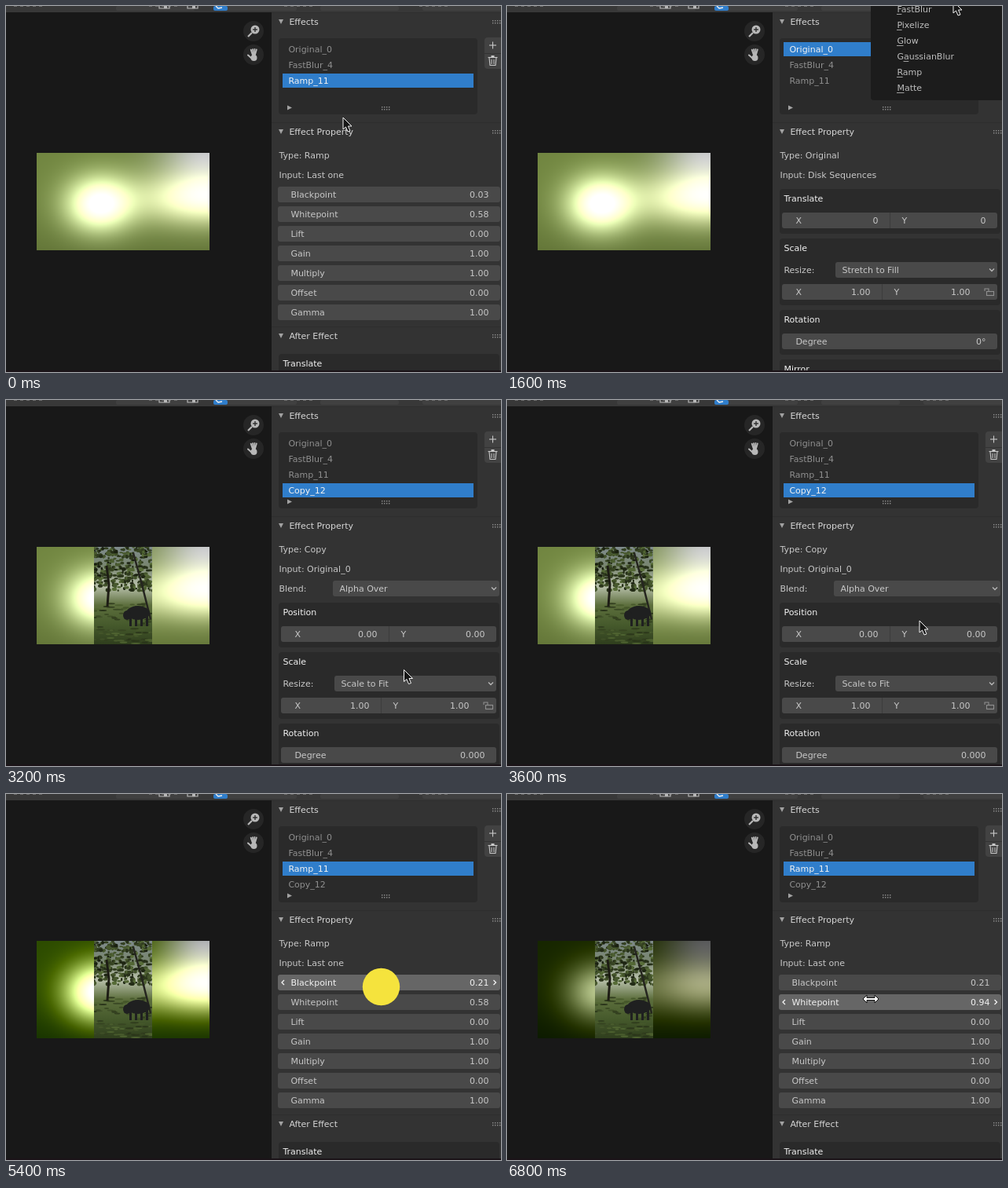
An HTML page with a canvas for the animation above (7 s loop, 630x466 px).

```html
<!DOCTYPE html>
<html lang="en">
<head>
<meta charset="utf-8">
<title>Effect panel</title>
<style>
html, body { margin: 0; width: 630px; height: 466px; overflow: hidden; background: #181818; }
canvas { display: block; }
</style>
</head>
<body>
<canvas id="stage" width="630" height="466"></canvas>
<script>
const c = document.getElementById('stage').getContext('2d', { alpha: false });
const LOOP = 7000, TICK = 200;
const BLUE = '#307ecb', FIELD = '#494949', BOX = '#2a2a2a', PANEL = '#333333', MENU = '#1c1c1c';
const DIM = '#8f8f8f', TEXT = '#c8c8c8', WHITE = '#f2f2f2', ICON = '#b8b8b8';

// Pointer stops; hold is how long the button stays down
const STOPS = [
  { at: 0, x: 429, y: 142 },
  { at: 600, x: 396, y: 56, hold: 200 },
  { at: 1200, x: 618, y: 50, hold: 200 },
  { at: 1600, x: 568, y: -6 },
  { at: 2000, x: 552, y: -36 },
  { at: 2400, x: 488, y: 361, hold: 200 },
  { at: 2600, x: 488, y: 406, hold: 200 },
  { at: 3600, x: 525, y: 281 },
  { at: 4200, x: 440, y: 95, hold: 200 },
  { at: 4800, x: 477, y: 245 },
  { at: 5000, x: 477, y: 245, hold: 600 },
  { at: 6000, x: 463, y: 261 },
  { at: 6200, x: 463, y: 261, hold: 600 }
];

const mix = (a, b, k) => a + (b - a) * k;
const ramp = (t, from, to) => Math.min(1, Math.max(0, (t - from) / (to - from)));
const range = n => [...Array(n).keys()];

function pointerAt(t) {
  const i = STOPS.findLastIndex(s => s.at <= t);
  const a = STOPS[i], b = STOPS[i + 1] || a, left = a.at + (a.hold || 0);
  const k = b === a || t <= left ? 0 : ramp(t, left, b.at);
  return { x: mix(a.x, b.x, k), y: mix(a.y, b.y, k), pressed: t < left };
}

function rect(x, y, w, h, fill, r = 0) {
  c.fillStyle = fill;
  c.beginPath();
  c.roundRect(x, y, w, h, r);
  c.fill();
}

function label(s, x, y, fill = TEXT, align = 'left') {
  c.font = '11px "DejaVu Sans", sans-serif';
  c.textAlign = align;
  c.fillStyle = fill;
  c.fillText(s, x + .4, y + 4);
}

function line(points, color, width) {
  c.strokeStyle = color;
  c.lineWidth = width;
  c.beginPath();
  points.forEach(p => c.lineTo(...p));
  c.stroke();
}

function poly(points, fill) {
  c.fillStyle = fill;
  c.beginPath();
  points.forEach(p => c.lineTo(...p));
  c.closePath();
  c.fill();
}

function disc(x, y, rx, fill, ry = rx) {
  c.fillStyle = fill;
  c.beginPath();
  c.ellipse(x, y, rx, ry, 0, 0, 7);
  c.fill();
}

function plus(x, y, r, color, width) {
  line([[x - r, y], [x + r, y]], color, width);
  line([[x, y - r], [x, y + r]], color, width);
}

function chevron(x, y, turn, color) {
  c.save();
  c.translate(x, y);
  c.rotate(turn * Math.PI / 2);
  line([[-1.5, -3], [1.5, 0], [-1.5, 3]], color, 1.3);
  c.restore();
}

function triangle(x, y, down) {
  c.save();
  c.translate(x, y);
  if (down) c.rotate(Math.PI / 2);
  poly([[-3, -3], [3, 0], [-3, 3]], '#a2a2a2');
  c.restore();
}

function grip(x, y) {
  for (const i of range(8)) rect(x + (i % 4) * 3, y - 2 + (i >> 2) * 3, 1.4, 1.4, '#8c8c8c');
}

function header(s, y) {
  rect(338, y - 12, 292, 1, '#2e2e2e');
  triangle(350, y, true);
  label(s, 360, y, '#d6d6d6');
  grip(619, y);
}

function menuItem(s, x, y, key) {
  const left = c.measureText(s.slice(0, key)).width;
  label(s, x, y, '#bdbdbd');
  c.textAlign = 'left';
  rect(x + left, y + 6, c.measureText(s[key]).width, 1, '#a0a0a0');
}

// Blurred backdrop: a flat olive tone with soft lights, remapped by the ramp levels
const W = 220, H = 124, base = new Float32Array(W * H * 3);
const pixels = c.createImageData(W, H);

function addLight(cx, cy, sx, sy, rgb) {
  for (const i of range(W * H)) {
    const x = (i % W - cx) / sx, y = (Math.floor(i / W) - cy) / sy;
    const g = Math.exp(-(x * x + y * y) / 2);
    rgb.forEach((v, k) => base[i * 3 + k] += v * g);
  }
}
addLight(80, 20, 900, 220, [.275, .32, .17]);
addLight(79, 65, 30, 25, [.45, .45, .43]);
addLight(214, 57, 60, 24, [.40, .37, .38]);
addLight(216, 0, 42, 26, [.17, .13, .28]);

function backdrop(lo, hi) {
  base.forEach((v, i) => pixels.data[Math.floor(i / 3) * 4 + i % 3] = 255 * (v - lo) / (hi - lo));
  for (const i of range(W * H)) pixels.data[i * 4 + 3] = 255;
  c.putImageData(pixels, 39, 187);
}

function meadow(x, y, w) {
  let seed = 7;
  const rnd = () => (seed = seed * 16807 % 2147483647) / 2147483647;
  c.save();
  c.translate(x, y);
  c.scale(w / 74, w / 74);
  c.beginPath();
  c.rect(0, 0, 74, 124);
  c.clip();
  const g = c.createLinearGradient(0, 0, 0, 124);
  ['#7f8b8c', '#78856f', '#b9c1ac', '#5c6e3c', '#465a2c', '#2f3e1d'].forEach((s, i) => g.addColorStop(i / 5, s));
  c.fillStyle = g;
  c.fillRect(0, 0, 74, 124);
  for (const i of range(330))
    disc(74 * rnd() ** 1.2, 56 * rnd() ** 1.1, 1 + 2.6 * rnd(), `hsl(84 32% ${9 + 24 * rnd()}%)`, 1 + 1.5 * rnd());
  for (const i of range(90))
    disc(74 * rnd(), 72 + 52 * rnd(), 2 + 4 * rnd(), `hsl(84 34% ${15 + 16 * rnd()}%)`, 1);
  line([[17, 76], [19, 48], [16, 24]], '#1e1d15', 3);
  line([[50, 8], [60, 44], [72, 92]], '#25251f', 2.5);
  disc(56, 84, 15, '#1f2020', 9);
  disc(42, 87, 5, '#1f2020', 6);
  for (const i of range(4)) rect(45 + 7 * i, 87, 3, 14, '#1f2020');
  c.restore();
}

function navButtons() {
  for (const y of [32, 62]) disc(315, y, 13, '#262626');
  line([[308, 39], [313, 34]], ICON, 2.2);
  disc(317, 30, 5.5, ICON);
  plus(317, 30, 3, '#262626', 1.3);
  c.lineCap = 'round';
  for (const i of range(4)) {
    const a = (i - 1.6) * .2;
    line([[315.5, 67], [315.5 + 12 * Math.sin(a), 67 - 12 * Math.cos(a)]], ICON, 1.9);
  }
  line([[308, 62.5], [313, 67]], ICON, 2);
  c.lineCap = 'butt';
  disc(315.5, 66, 4, ICON);
}

function topBar() {
  rect(0, 0, 630, 8, '#383838');
  for (const i of range(4)) {
    rect(140 + 130 * i, 0, 100, 6, '#404040', 2);
    for (const k of range(5)) rect(10 + 172 * i + 8 * k, 0, 4, 1, '#6a6a6a');
  }
  rect(264, 0, 18, 6, BLUE, 2);
  line([[267, 0], [270, 3], [275, 2]], WHITE, 1.3);
  for (const x of [195, 231]) {
    line([[x, 0], [x, 3], [x + 13, 3], [x + 13, 0]], ICON, 1.2);
    rect(x + 6, 0, 4, 3, ICON);
  }
}

function effectList(names, selected) {
  header('Effects', 20);
  rect(347, 41, 253, 97, BOX, 4);
  names.forEach((s, i) => {
    const y = 55 + 20 * i, on = s.startsWith(selected);
    if (on) rect(352, y - 9, 243, 18, BLUE);
    label(s, 359, y, on ? WHITE : DIM);
  });
  triangle(361, 129.5);
  grip(478, 130);
  rect(609, 40, 24, 40, '#424242', 4);
  rect(609, 60, 21, 1, PANEL);
  plus(619.5, 50, 4.5, TEXT, 1.1);
  line([[615, 66], [616, 75.5], [623, 75.5], [624, 66]], TEXT, 1.1);
  line([[613.5, 65.5], [625.5, 65.5]], TEXT, 1.1);
  rect(617.5, 63, 4, 2, TEXT);
  for (const x of [618, 621]) line([[x, 68], [x, 74]], TEXT, 1);
}

function pair(y, value, inset) {
  rect(350, y - 10, 274, 20, FIELD, 3);
  rect(487 - inset / 2, y - 10, 1, 20, '#3c3c3c');
  label('X', 367, y);
  label(value, 472 - inset / 2, y, TEXT, 'right');
  label('Y', 502 - inset / 2, y);
  label(value, 609 - inset, y, TEXT, 'right');
}

function select(s, x, y, w, open) {
  rect(x, y - 10, w, 20, open ? BLUE : FIELD, 3);
  label(s, x + 8, y, open ? WHITE : TEXT);
  chevron(x + w - 7, y, 1, ICON);
}

function section(title, y, h) {
  rect(347, y - 12, 281, h, BOX, 4);
  label(title, 352, y, WHITE);
}

function transform(y, title, pos, resize, degree, open) {
  section(title, y, 57);
  pair(y + 28, pos, 0);
  section('Scale', y + 63, 85);
  label('Resize:', 352, y + 91);
  select(resize, 418, y + 91, 206, open);
  pair(y + 119, '1.00', 20);
  line([[608, y + 118], [608, y + 115], [613, y + 115], [613, y + 119]], DIM, 1.1);
  c.strokeRect(610.5, y + 118.5, 9, 5);
  section('Rotation', y + 154, 57);
  rect(350, y + 172, 274, 20, FIELD, 3);
  label('Degree', 367, y + 182);
  label(degree, 609, y + 182, TEXT, 'right');
  section('Mirror', y + 217, 57);
}

function rampPanel(lo, hi, hover) {
  const rows = { Blackpoint: lo, Whitepoint: hi, Lift: 0, Gain: 1, Multiply: 1, Offset: 0, Gamma: 1 };
  Object.entries(rows).forEach(([s, v], i) => {
    const y = 240 + 25 * i, on = i === hover, color = on ? WHITE : TEXT;
    rect(346, y - 10, 283, 20, on ? '#666666' : FIELD, 3);
    label(s, 362, y, color);
    label(v.toFixed(2), 614, y, color, 'right');
    if (on) {
      chevron(352.5, y, 2, WHITE);
      chevron(622, y, 0, WHITE);
    }
  });
  header('After Effect', 420);
  section('Translate', 455, 40);
}

function addMenu() {
  rect(463, -8, 180, 128, MENU, 4);
  ['FastBlur', 'Pixelize', 'Glow', 'GaussianBlur', 'Ramp', 'Matte']
    .forEach((s, i) => menuItem(s, 496, 4 + 20 * i, s === 'GaussianBlur' ? 1 : 0));
}

function resizeMenu(y) {
  rect(416, 371, 209, 100, MENU);
  const row = Math.round((y - 384) / 22);
  if (row >= 0) rect(419, 375 + 22 * row, 204, 18, BLUE);
  Object.entries({ 'Original': 0, 'Scale to Fit': 0, 'Scale to Fill': 6, 'Stretch to Fill': 1 })
    .forEach(([s, key], i) => menuItem(s, 426, 384 + 22 * i, key));
}

function pointer({ x, y, pressed }, sideways) {
  if (pressed) return disc(x + .5, y + .5, 23.7, '#f5e33d');
  const half = [[0, -1.5], [5, -1.5], [5, -5], [10, 0], [5, 5], [5, 1.5], [0, 1.5]];
  const shape = sideways
    ? [...half, ...half.map(([a, b]) => [-a, -b])]
    : [[0, 0], [0, 15], [3.5, 12], [6, 18], [9, 17], [6.5, 11], [11, 11]];
  c.save();
  c.translate(x, y);
  poly(shape, sideways ? '#ffffff' : '#171717');
  line([...shape, shape[0]], sideways ? '#111111' : '#f4f4f4', 1);
  c.restore();
}

function draw(t) {
  const p = pointerAt(t);
  const lo = mix(.03, .21, ramp(t, 5000, 5400)), hi = mix(.58, .94, ramp(t, 6200, 6800));
  const copied = t >= 2000, fit = t >= 2800;
  const mode = t < 800 || t >= 4400 ? 'Ramp' : copied ? 'Copy' : 'Original';
  const input = { Original: 'Disk Sequences', Ramp: 'Last one', Copy: 'Original_0' }[mode];
  const onSlider = mode === 'Ramp' && p.y > 228 && p.y < 402;

  rect(0, 0, 630, 466, '#181818');
  backdrop(lo, hi);
  if (fit) meadow(112, 187, 74);
  else if (copied) meadow(124, 207, 50);
  navButtons();

  rect(338, 8, 292, 458, PANEL);
  topBar();
  effectList(['Original_0', 'FastBlur_4', 'Ramp_11', ...(copied ? ['Copy_12'] : [])], mode);
  header('Effect Property', 160);
  label('Type: ' + mode, 347, 190);
  label('Input: ' + input, 347, 215);

  if (mode === 'Ramp') rampPanel(lo, hi, onSlider ? Math.floor((p.y - 228) / 25) : -1);
  if (mode === 'Original') transform(245, 'Translate', '0', 'Stretch to Fill', '0°');
  if (mode === 'Copy') {
    const open = t >= 2400 && !fit;
    label('Blend:', 347, 240);
    select('Alpha Over', 416, 240, 212);
    transform(270, 'Position', '0.00', fit ? 'Scale to Fit' : 'Original', '0.000', open);
    if (open) resizeMenu(p.y);
  }
  if (t >= 1400 && !copied) addMenu();
  rect(0, 464, 630, 2, '#1b1318');
  pointer(p, onSlider);
}

const start = performance.now();
let shown = -1;
function frame() {
  const t = Math.floor((performance.now() - start) % LOOP / TICK) * TICK;
  if (t !== shown) draw(shown = t);
  requestAnimationFrame(frame);
}
frame();
</script>
</body>
</html>
```
